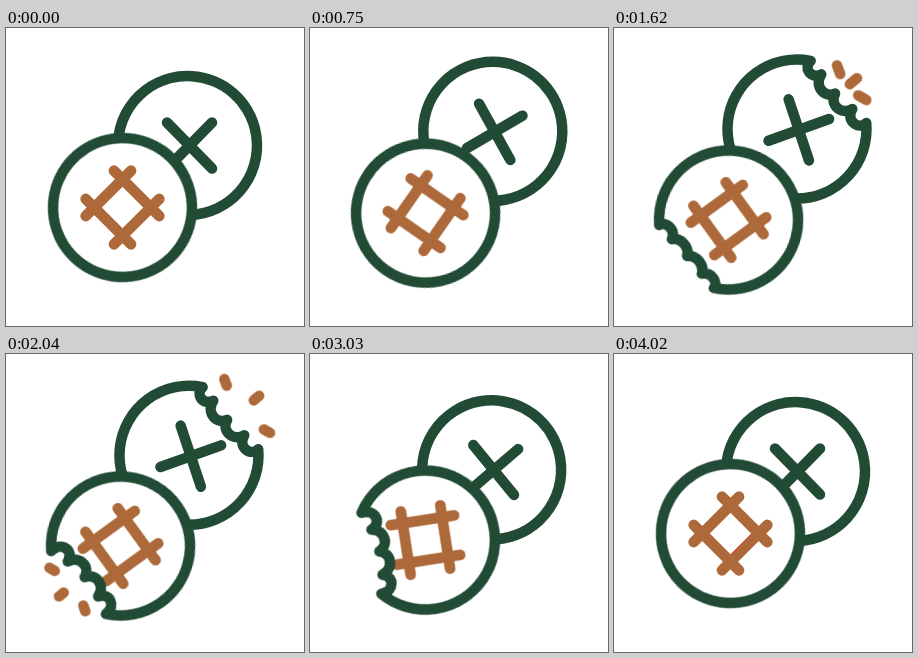
An HTML page that plays this animation: 298x298 px, repeating every 5400 ms.

```html
<!DOCTYPE html>
<html lang="en">
<head>
<meta charset="utf-8">
<title>Biscuits</title>
<style>
  :root {
    --green: #224b36;
    --brown: #ad6939;
    --loop: 5400ms infinite;
    --soft: cubic-bezier(.37, 0, .63, 1);
    --whole: path("M55.6 -41.7A69.5 69.5 0 1 0 55.6 41.7C60.1 35.7 63.6 29.1 65.9 22C68.3 14.9 69.5 7.5 69.5 0C69.5 -7.5 68.3 -14.9 65.9 -22C63.6 -29.1 60.1 -35.7 55.6 -41.7Z");
    --shallow: path("M55.6 -41.7A69.5 69.5 0 1 0 55.6 41.7C45 42 41.5 26 54.5 22C41.5 19 40.5 3 52 -1C40.5 -5 41.5 -21 54.5 -24.5C42.5 -28 46 -42 55.6 -41.7Z");
    --deep: path("M55.6 -41.7A69.5 69.5 0 1 0 55.6 41.7C42 43 37 27 50 23C37 20 36 4 47.5 0C36 -4 37 -20 50 -23.5C38 -28 43 -43 55.6 -41.7Z");
  }
  html, body { margin: 0; width: 100%; height: 100%; overflow: hidden; background: #fff; }
  svg { display: block; width: 100vw; height: 100vh; }

  .plate { fill: #fff; }
  .rim, .cross, .hash, .crumbs { fill: none; stroke-linecap: round; stroke-linejoin: round; }
  .rim { stroke: var(--green); stroke-width: 10.5; d: var(--whole); }
  .cross { stroke: var(--green); stroke-width: 10.5; }
  .hash { stroke: var(--brown); stroke-width: 10.8; }
  .crumbs { stroke: var(--brown); stroke-width: 10.5; stroke-dasharray: .01px 200px; opacity: 0; }
  .glint { stroke: #e8382c; stroke-width: 1; opacity: 0; animation: glint var(--loop) step-end; }

  .back { translate: 181.5px 117.5px; animation: back-move var(--loop) var(--soft), back-spin var(--loop) var(--soft); }
  .back .rim { animation: back-bite var(--loop) ease-in-out; }
  .back .crumbs { animation: back-fly var(--loop) linear, back-show var(--loop) step-end; }

  .front { translate: 116.5px 179.5px; animation: front-move var(--loop) var(--soft), front-spin var(--loop) var(--soft); }
  .front .rim { animation: front-bite var(--loop) ease-in-out; }
  .front .crumbs { translate: -5px 0; animation: front-fly var(--loop) linear, front-show var(--loop) step-end; }

  @keyframes back-move {
    0%, 61.5%, 100% { translate: 181.5px 117.5px; }
    18.5%, 35.6% { translate: 183px 101px; }
  }
  @keyframes back-spin {
    0%, 62.8%, 100% { rotate: 0deg; }
    25%, 40.2% { rotate: 26deg; }
  }
  @keyframes front-move {
    0%, 74.4%, 100% { translate: 116.5px 179.5px; }
    29.6%, 38.9% { translate: 114.5px 192px; }
  }
  @keyframes front-spin {
    0%, 9.1%, 74.4%, 100% { rotate: 0deg; }
    29.8% { rotate: -81deg; }
    37.8% { rotate: -81deg; animation-timing-function: cubic-bezier(.55, 0, .73, 1); }
  }
  @keyframes back-bite {
    0%, 23.3%, 53.7%, 100% { d: var(--whole); }
    26.7%, 48.1% { d: var(--shallow); }
  }
  @keyframes front-bite {
    0%, 27.8%, 65.6%, 100% { d: var(--whole); }
    31.5%, 60% { d: var(--deep); }
  }

  /* Each crumb is one dash: its length, then how far its tail has travelled */
  @keyframes back-fly {
    0%, 26.7% { stroke-dasharray: 4px 200px; stroke-dashoffset: -14px; }
    31.7% { stroke-dasharray: 12px 200px; stroke-dashoffset: -28px; }
    37.8% { stroke-dasharray: 7px 200px; stroke-dashoffset: -39px; }
    46.7%, 100% { stroke-dasharray: .01px 200px; stroke-dashoffset: -47.5px; }
  }
  @keyframes front-fly {
    0%, 31.7% { stroke-dasharray: 4px 200px; stroke-dashoffset: -14px; }
    37.8% { stroke-dasharray: 6px 200px; stroke-dashoffset: -32.5px; }
    46.7% { stroke-dasharray: 4px 200px; stroke-dashoffset: -40.5px; }
    52.8%, 100% { stroke-dasharray: .01px 200px; stroke-dashoffset: -47.5px; }
  }
  @keyframes back-show {
    0%, 47.8%, 100% { opacity: 0; }
    26.7% { opacity: 1; }
  }
  @keyframes front-show {
    0%, 53.3%, 100% { opacity: 0; }
    31.7% { opacity: 1; }
  }
  @keyframes glint {
    0% { opacity: 0; }
    74.44%, 100% { opacity: 1; }
  }
</style>
</head>
<body>
<svg viewBox="0 0 298 298">
  <defs>
    <path id="crumb" d="M0 0h60"/>
    <g id="spray" transform="rotate(1.5)">
      <use href="#crumb" transform="translate(46 0)"/>
      <use href="#crumb" transform="translate(60.5 -8) rotate(70)"/>
      <use href="#crumb" transform="translate(60.5 8) rotate(-70)"/>
    </g>
  </defs>

  <g class="back">
    <circle class="plate" r="69.5"/>
    <path class="cross" d="M-20.5 -23l45 46M24.5 -23l-45 46"/>
    <g transform="rotate(-67.8)">
      <path class="rim"/>
      <use class="crumbs" href="#spray"/>
    </g>
  </g>

  <g class="front">
    <circle class="plate" r="69.5"/>
    <path class="hash" transform="rotate(45)" d="M-32 -20h64M-32 20h64M-20 -32v64M20 -32v64"/>
    <g transform="rotate(220)">
      <path class="rim"/>
      <use class="crumbs" href="#spray"/>
    </g>
  </g>

  <path class="glint" d="M118 200l19 -19"/>
</svg>
</body>
</html>
```
